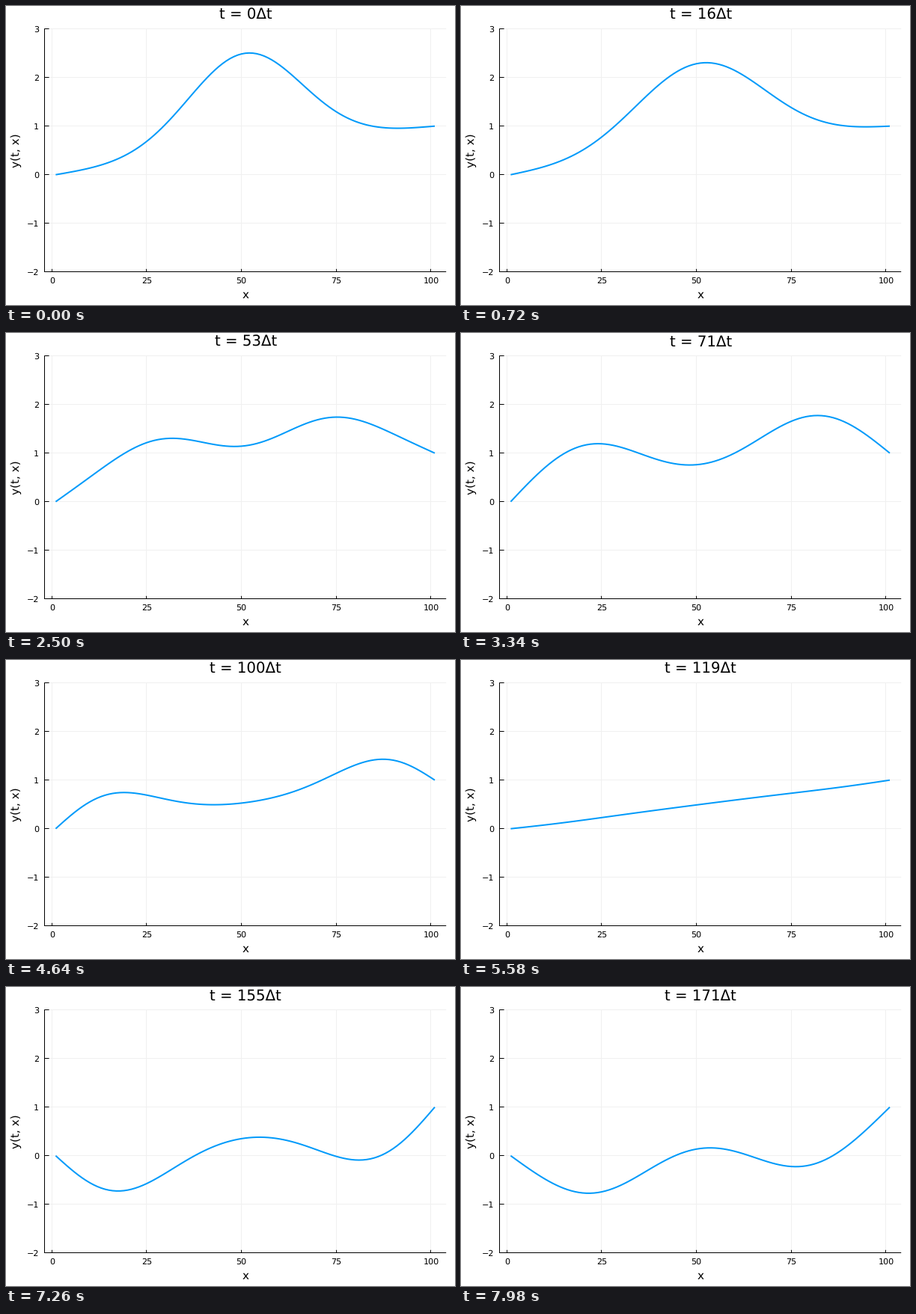
A matplotlib script that plays this animation: 600x400 px, repeating every 8 s.

```python
import numpy as np
import matplotlib.pyplot as plt
from matplotlib.animation import FuncAnimation

W, H, DPI = 600, 400, 100
LEFT, RIGHT, TOP, BOTTOM = 51.18, 588.19, 30.7, 355.7
MID_X = (LEFT + RIGHT) / 2
X_MIN, X_MAX, Y_MIN, Y_MAX = -2, 104, -2, 3

TICK_MS = 20      # the steps last 20, 100 and 20 ms in turn
CYCLE = 7         # ticks in three steps
FRAMES = 400

SIGMA = 0.15
SHIFT = 0.0042    # distance a wave travels per step

plt.rcParams["font.family"] = "DejaVu Sans"
plt.rcParams["text.hinting"] = "none"


def px(x):
    return LEFT + (x - X_MIN) / (X_MAX - X_MIN) * (RIGHT - LEFT)


def py(y):
    return BOTTOM - (y - Y_MIN) / (Y_MAX - Y_MIN) * (BOTTOM - TOP)


def crisp(v):
    """Centre of the pixel that holds v."""
    return np.floor(v) + 0.5


nodes = np.arange(1, 102)
xi = (nodes - 1) / 100


def pulse(x):
    """Gaussian bump mirrored with alternating sign at both fixed ends."""
    return sum((-1) ** m * np.exp(-(x - 0.5 - m) ** 2 / (2 * SIGMA ** 2))
               for m in range(-3, 4))


def string(step):
    # velocity is updated before position, so the wave leads by half a step
    d = SHIFT * (step + 0.5)
    return xi + pulse(xi - d) + pulse(xi + d)


def step_at(frame):
    cycle, r = divmod(frame, CYCLE)
    return 3 * cycle + (r > 0) + (r == CYCLE - 1)


fig = plt.figure(figsize=(W / DPI, H / DPI), dpi=DPI, facecolor="white")
ax = fig.add_axes([0, 0, 1, 1])
ax.set_xlim(0, W)
ax.set_ylim(H, 0)
ax.axis("off")


def line(x, y, color="black", width=1.0):
    return ax.plot(x, y, color=color, lw=width * 72 / DPI, snap=False,
                   solid_capstyle="butt")[0]


def vline(x, y0, y1, color="black"):
    line([crisp(x)] * 2, [y0, y1], color)


def hline(y, x0, x1, color="black"):
    line([x0, x1], [crisp(y)] * 2, color)


def label(x, y, text, size, ha="center", **kw):
    return ax.text(x, y, text, fontsize=size, ha=ha, va="baseline", **kw)


x_ticks = range(0, 101, 25)
y_ticks = range(Y_MIN, Y_MAX + 1)

for v in x_ticks:
    vline(px(v), TOP, BOTTOM, "#f0f0f0")
for v in y_ticks:
    hline(py(v), LEFT, RIGHT, "#f0f0f0")

for v in x_ticks:
    vline(px(v), BOTTOM - 3.9, BOTTOM)
    label(px(v), 371, str(v), 8)
for v in y_ticks:
    hline(py(v), LEFT, LEFT + 6.4)
    label(44, py(v) + 4, str(v).replace("-", "\u2212"), 8, "right")

hline(BOTTOM, LEFT, RIGHT)
vline(LEFT, TOP, BOTTOM)

label(MID_X, 391.3, "x", 11)
label(17.5, (TOP + BOTTOM) / 2, "y(t, x)", 11, rotation=90,
      rotation_mode="anchor")

title = label(MID_X + 0.5, 18, "", 14.2)
curve = line(px(nodes), py(string(0)), "#009afa", 2)


def draw(frame):
    step = step_at(frame)
    curve.set_ydata(py(string(step)))
    title.set_text(f"t = {step}\u0394t")
    return curve, title


anim = FuncAnimation(fig, draw, frames=FRAMES, interval=TICK_MS,
                     repeat=True, repeat_delay=0, blit=True)
plt.show()
```
